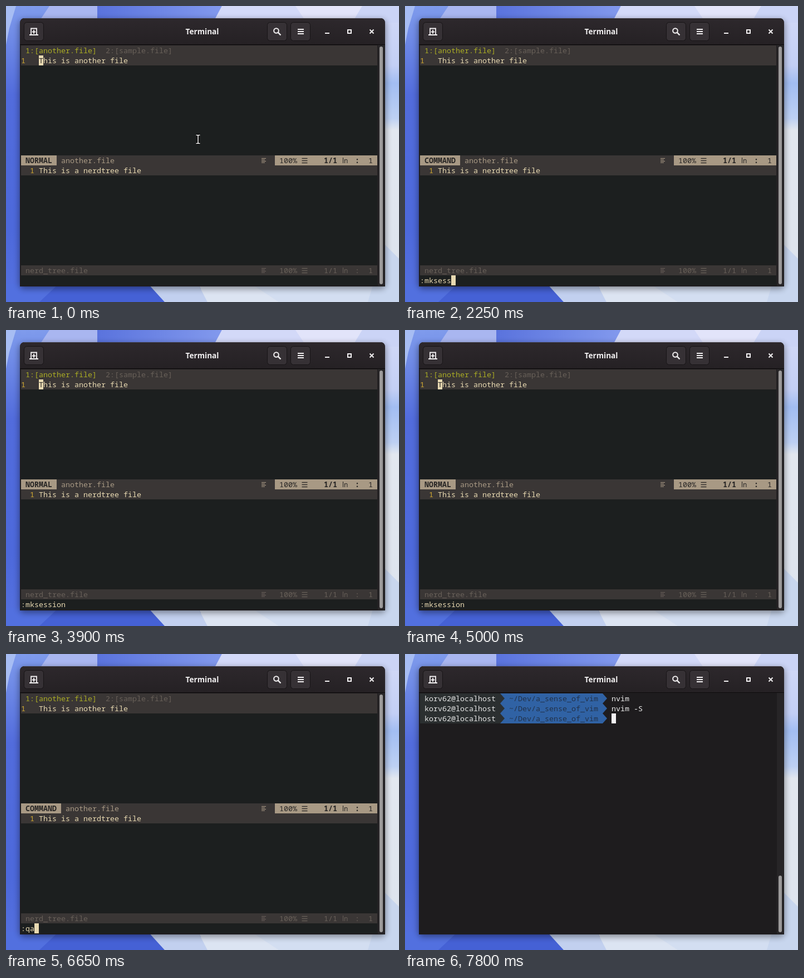
An HTML page for the animation above (8000 ms loop, 706 by 533 pixels).

```html
<!DOCTYPE html>
<html lang="en">
<head>
<meta charset="utf-8">
<title>Terminal session</title>
<style>
  html, body { margin: 0; width: 100%; height: 100%; overflow: hidden; background: #5873dd; }
  svg { display: block; width: 100vw; height: 100vh; }
  text { white-space: pre; }
  .mono { font: 13.333px "Noto Sans Mono", "DejaVu Sans Mono", monospace; }
  .bold { font-weight: 700; }
  .title { font: 700 13.6px "Noto Sans", "Open Sans", sans-serif; }
  .ln { font: 12px "Noto Sans", "Open Sans", sans-serif; }
</style>
</head>
<body>
<svg id="stage" viewBox="0 0 706 533" preserveAspectRatio="none">
  <defs>
    <linearGradient id="left" x2="0" y2="1">
      <stop offset="0" stop-color="#7f9bec"/><stop offset=".3" stop-color="#526cdc"/>
      <stop offset=".75" stop-color="#4d69db"/><stop offset="1" stop-color="#5571df"/>
    </linearGradient>
    <linearGradient id="right" x2="0" y2="1">
      <stop offset="0" stop-color="#d3daf7"/><stop offset=".2" stop-color="#c3cff5"/>
      <stop offset=".26" stop-color="#a2bdf2"/><stop offset=".38" stop-color="#bdd0f3"/>
      <stop offset=".42" stop-color="#e2e7ef"/><stop offset="1" stop-color="#dce3ee"/>
    </linearGradient>
    <linearGradient id="topBlue">
      <stop offset="0" stop-color="#5a73dd"/><stop offset="1" stop-color="#8299ed"/>
    </linearGradient>
    <linearGradient id="head" x2="0" y2="1">
      <stop offset="0" stop-color="#2d282c"/><stop offset="1" stop-color="#252124"/>
    </linearGradient>
    <filter id="soft" x="-10%" y="-10%" width="120%" height="120%"><feGaussianBlur stdDeviation="6"/></filter>
  </defs>

  <g id="wallpaper">
    <rect width="360" height="533" fill="url(#left)"/>
    <rect x="350" width="356" height="533" fill="url(#right)"/>
    <path d="M0 0H18L6 40 0 70Z" fill="#a7bdf3"/>
    <path d="M78 0H165V30H58Z" fill="#a9b6f0"/>
    <path d="M164 0H388L372 30H164Z" fill="url(#topBlue)"/>
    <path d="M388 0H520L540 30H372Z" fill="#d3d9f8"/>
    <path d="M520 0H640L622 30H540Z" fill="#e2e4fa"/>
    <path d="M640 0H706V30H622Z" fill="#cbd4f6"/>
    <path d="M0 500H95L60 533H0Z" fill="#5270df"/>
    <path d="M95 500H255L285 533H60Z" fill="#4561d5"/>
    <path d="M255 500H345L362 533H285Z" fill="#c2d0ef"/>
    <path d="M345 500H440L490 533H362Z" fill="#dce4f2"/>
    <path d="M440 500H706V533H490Z" fill="#d3def1"/>
    <path d="M681 430L706 455V533H650Z" fill="#c8d6ee"/>
  </g>

  <rect x="24" y="25" width="658" height="484" rx="8" opacity=".42" filter="url(#soft)"/>
  <path d="M25 505V31Q25 22 34 22H672Q681 22 681 31V505Z" fill="#1e1c1e"/>
  <path d="M25 70V31Q25 22 34 22H672Q681 22 681 31V70Z" fill="url(#head)"/>
  <path d="M32 22.5H674" stroke="#3b363a"/>
  <path d="M25 69.5H681" stroke="#0d0b0c"/>
  <rect x="668" y="70" width="12" height="434" fill="#272527"/>
  <g id="buttons" fill="#363135" stroke="#171416">
    <rect x="32.500" y="29.500" width="35" height="33" rx="5"/>
    <rect x="469.500" y="29.500" width="35" height="33" rx="5"/>
    <rect x="511.500" y="29.500" width="35" height="33" rx="5"/>
  </g>
  <g id="icons" fill="none" stroke="#f2f0f1" stroke-width="2">
    <path d="M42 52H58M45 52V40.500H55V52M50 43V50M46.800 46.500H53.200" stroke-width="1.800"/>
    <circle cx="485.500" cy="44.500" r="4.300"/>
    <path d="M488.700 47.700L493.500 52.500" stroke-width="2.400"/>
    <path d="M524 42H535M524 46H535M524 50H535"/>
    <path d="M573 49H581"/>
    <rect x="614" y="43" width="6" height="6"/>
    <path d="M653.500 42.500L660.500 49.500M660.500 42.500L653.500 49.500"/>
  </g>
  <text class="title" x="352.500" y="51" text-anchor="middle" fill="#f2f0f1">Terminal</text>
  <g id="screen"></g>
  <rect id="thumb" x="671" width="6" rx="3" fill="#9c9a9a"/>
  <path id="beam" d="M341.500 232.500H344L345 233.500 346 232.500H348.500M345 233V247M341.500 247.500H344L345 246.500 346 247.500H348.500" fill="none"/>
</svg>

<script>
const LOOP = 8000, LEFT = 27, TOP = 71, CW = 8, CH = 18;
const ENTER = 3400, QUIT = 6950;
const saveKeys = [950, 1200, 1350, 1550, 1850, 2050, 2200, 2400, 2550, 2650];
const quitKeys = [6000, 6300, 6550];
const C = {
  bg: '#1c1f1f', bar: '#3a3635', cream: '#e8d9b1', tan: '#a89984', dim: '#686059',
  lime: '#aaac24', gold: '#d0a832', dark: '#282625', shell: '#2b2f30', blue: '#3062a4', path: '#22324a'
};
const $ = id => document.getElementById(id);
const px = col => LEFT + col * CW;
const py = row => TOP + row * CH;

const box = (col, row, cols, fill, rows = 1) =>
  `<rect x="${px(col)}" y="${py(row)}" width="${cols * CW}" height="${rows * CH}" fill="${fill}"/>`;
const put = (col, row, str, fill, bold = '') =>
  `<text class="mono ${bold}" x="${px(col)}" y="${py(row) + 14}" fill="${fill}">${str}</text>`;
const lines = (x, y, widths, gap, color, weight) => widths.map((w, i) =>
  `<path d="M${x} ${y + i * gap}h${w}" stroke="${color}" stroke-width="${weight}"/>`).join('');

function position(row, color, bold) {
  return put(58, row, '100%', color)
    + lines(531.5, py(row) + 5.5, [10, 10, 10], 4, color, 1.3)
    + put(68, row, '1/1', color, bold)
    + `<text class="ln ${bold}" x="604" y="${py(row) + 14}" fill="${color}">ln</text>`
    + put(75, row, ':', color, bold) + put(78, row, '1', color);
}

const alignIcon = (row, color) => lines(459, py(row) + 5.5, [8, 6, 8, 6], 2.5, color, 1.1);

function editor(mode, command) {
  const typing = mode === 'COMMAND';
  const tag = mode.length + 2;
  let out = box(0, 0, 80, C.bg, 24)
    + box(0, 0, 80, C.bar, 2)
    + put(1, 0, '1:[another.file]', C.lime) + put(19, 0, '2:[sample.file]', C.dim)
    + put(0, 1, '1', C.gold) + put(4, 1, 'This is another file', C.cream)
    + box(0, 11, 80, C.bar, 2)
    + box(0, 11, tag, C.tan) + put(1, 11, mode, C.dark, 'bold')
    + put(tag + 1, 11, 'another.file', C.tan)
    + alignIcon(11, C.tan)
    + box(57, 11, 23, C.tan) + position(11, C.dark, 'bold')
    + put(2, 12, '1', C.gold) + put(4, 12, 'This is a nerdtree file', C.cream)
    + box(0, 22, 80, C.bar) + put(1, 22, 'nerd_tree.file', C.dim)
    + alignIcon(22, C.dim) + position(22, C.dim, '')
    + put(0, 23, command, C.cream);
  out += typing ? box(command.length, 23, 1, C.cream)
    : box(4, 1, 1, C.cream) + put(4, 1, 'T', C.dark);
  return out;
}

function arrow(from, to, row, fill) {
  const x = px(to), y = py(row);
  return `<path d="M${px(from)} ${y}H${x}l8 9-8 9H${px(from)}Z" fill="${fill}"/>`;
}

function shell() {
  return ['nvim', 'nvim -S', ''].map((cmd, row) =>
    arrow(18, 41, row, C.blue) + arrow(0, 18, row, C.shell)
    + put(1, row, 'korv62@localhost', '#e4e4e4')
    + put(20, row, '~/Dev/a_sense_of_vim', C.path)
    + put(43, row, cmd, '#eeeeee')).join('') + box(43, 2, 1, '#f4f2f4');
}

const typed = (str, keys, t) => str.slice(0, keys.filter(k => k <= t).length);

function view(t) {
  if (t >= QUIT) return shell();
  if (t >= quitKeys[0]) return editor('COMMAND', typed(':qa', quitKeys, t));
  if (t >= ENTER) return editor('NORMAL', ':mksession');
  if (t >= saveKeys[0]) return editor('COMMAND', typed(':mksession', saveKeys, t));
  return editor('NORMAL', '');
}

// White pointer with a dark outline
const outline = $('beam').cloneNode();
outline.removeAttribute('id');
outline.setAttribute('stroke', '#000');
outline.setAttribute('stroke-width', 4);
$('beam').setAttribute('stroke', '#fff');
$('beam').setAttribute('stroke-width', 1.5);
$('beam').before(outline);

let shown = '';
function draw(now) {
  const t = now % LOOP;
  const next = view(t);
  if (next !== shown) {
    $('screen').innerHTML = shown = next;
    const top = t >= QUIT ? 399 : 73;
    $('thumb').setAttribute('y', top);
    $('thumb').setAttribute('height', 501 - top);
    const visible = t < saveKeys[0] ? 'visible' : 'hidden';
    $('beam').setAttribute('visibility', visible);
    outline.setAttribute('visibility', visible);
  }
}

const start = performance.now();
function tick() {
  draw(performance.now() - start);
  requestAnimationFrame(tick);
}
tick();
</script>
</body>
</html>
```
